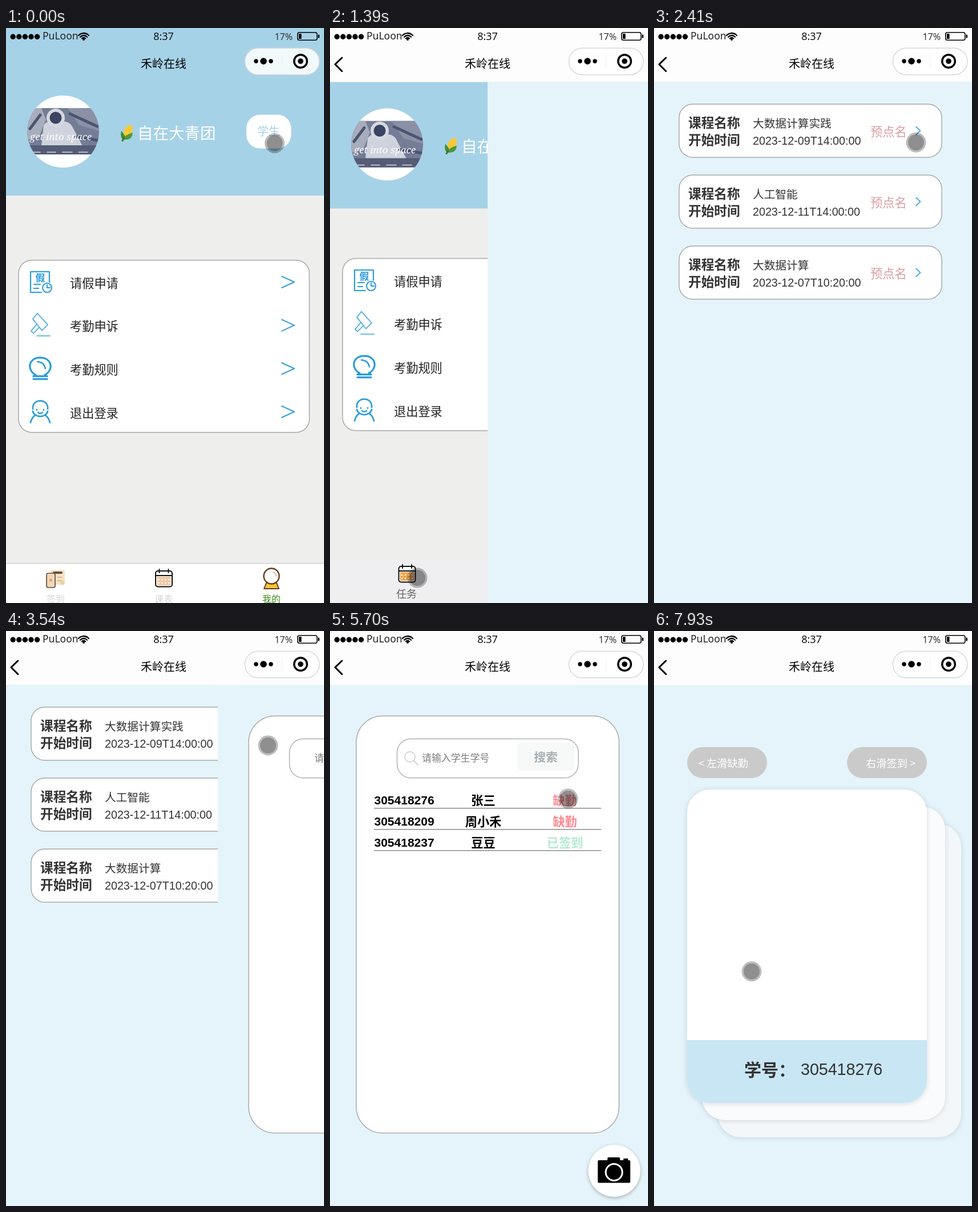
These frames come from a looping animation (557 by 1005 pixels, 8 s). An HTML page with a canvas:

```html
<!DOCTYPE html>
<html lang="zh-CN">
<head>
<meta charset="utf-8">
<style>
html, body { margin: 0; width: 100%; height: 100%; overflow: hidden; background: #fff; }
canvas { display: block; }
</style>
</head>
<body>
<canvas id="stage" width="557" height="1005"></canvas>
<script>
const W = 557, H = 1005, NAV = 94.5, LOOP = 8000, GAP = 8;
const ctx = document.getElementById('stage').getContext('2d');
const HAN = '"Noto Sans CJK SC", "Noto Sans CJK", "Noto Sans", sans-serif';
const ARIAL = '"Liberation Sans", sans-serif';
const UI = '"Noto Sans", sans-serif';
const BLUE = '#2b9cdb', SKY = '#a6d2e7', PALE = '#e5f4fa', EDGE = '#a6aaac';

// Touch moves: start, end, number of steps, destination
const moves = [
  [100, 390, 4, 459, 201], [1030, 1300, 4, 153, 961], [1830, 2410, 7, 459, 200],
  [4480, 4480, 1, 446, 226], [4850, 5050, 3, 414, 305], [5240, 5340, 2, 417, 305],
  [5700, 5700, 1, 417, 293], [6450, 6740, 4, 250, 222], [6830, 7110, 4, 377, 238],
  [7290, 7570, 4, 268, 481], [7750, 7930, 3, 171, 595]
];

// Left edge of each incoming page over time
const slides = {
  list: [[1300, 540], [1390, 276], [1470, 0]],
  search: [[3450, 550], [3540, 371], [3640, 64], [3730, 0]],
  card: [[7190, 64], [7290, 0]]
};

const courses = [
  ['大数据计算实践', '2023-12-09T14:00:00'],
  ['人工智能', '2023-12-11T14:00:00'],
  ['大数据计算', '2023-12-07T10:20:00']
];
const FOUND = '305418276';
const students = [[FOUND, '张三', 0], ['305418209', '周小禾', 0], ['305418237', '豆豆', 1]];

function text(s, x, yc, size, color, { font = HAN, weight = 400, align = 'left' } = {}) {
  ctx.font = `${weight} ${size}px ${font}`;
  ctx.textAlign = align;
  ctx.fillStyle = color;
  ctx.fillText(s, x, yc + size * 0.37);
}

function rect(x, y, w, h, color) {
  ctx.fillStyle = color;
  ctx.fillRect(x, y, w, h);
}

function paint(fill, stroke, width = 1.5) {
  if (fill) { ctx.fillStyle = fill; ctx.fill(); }
  if (stroke) { ctx.strokeStyle = stroke; ctx.lineWidth = width; ctx.stroke(); }
}

function box(x, y, w, h, r, fill, stroke, width) {
  ctx.beginPath();
  ctx.roundRect(x, y, w, h, r);
  paint(fill, stroke, width);
}

function disc(x, y, r, fill, stroke, width) {
  ctx.beginPath();
  ctx.arc(x, y, r, 0, Math.PI * 2);
  paint(fill, stroke, width);
}

function oval(x, y, rx, ry, turn, fill) {
  ctx.beginPath();
  ctx.ellipse(x, y, rx, ry, turn, 0, Math.PI * 2);
  paint(fill);
}

function path(d, stroke, width, fill) {
  const p = new Path2D(d);
  if (fill) { ctx.fillStyle = fill; ctx.fill(p); }
  if (stroke) { ctx.strokeStyle = stroke; ctx.lineWidth = width; ctx.stroke(p); }
}

function at(x, y, draw) {
  ctx.save();
  ctx.translate(x, y);
  draw();
  ctx.restore();
}

function shadowed(color, blur, dy, draw) {
  ctx.save();
  ctx.shadowColor = color;
  ctx.shadowBlur = blur;
  ctx.shadowOffsetY = dy;
  draw();
  ctx.restore();
}

const menu = [
  ['请假申请', () => {
    path('M2 18H-17V-18H16V0', BLUE, 2.2);
    text('假', 0, -7, 17, BLUE, { weight: 700, align: 'center' });
    path('M-11 4H0M-11 11H-3', BLUE, 2.2);
    disc(12, 10, 8, '#fff', BLUE, 2.2);
    path('M12 5V10H17', BLUE, 2);
  }],
  ['考勤申诉', () => {
    path('M-5 -21L13 -1L3 9L-13 -11ZM-6 -2L-16 10L-12 14L-2 4M-6 18.5H17', '#58b2e2', 1.9);
  }],
  ['考勤规则', () => {
    path('M-8 11C-24 3 -21 -19 0 -19C21 -19 24 3 8 11M-8 11L-12 13.5H12L8 11M-12 18.5H12', BLUE, 3.2);
    path('M-5 -12Q7 -11 9 0', BLUE, 2.5);
  }],
  ['退出登录', () => {
    path('M-13 -5C-15 -24 15 -24 13 -5M-13 -1C-10 11 10 11 13 -1', BLUE, 2.7);
    path('M-17 19Q-15 10 -9 6M17 19Q15 10 9 6', BLUE, 2.7);
    path('M-4 1Q0 5 4 1M-6 -4V-3M6 -4V-3', BLUE, 2.4);
  }]
];

function avatar() {
  ctx.save();
  disc(100, 181, 63, '#fff');
  ctx.clip();
  rect(37, 140, 126, 81, '#747c96');
  path('M37 140H62L70 160L58 190L37 196Z', 0, 0, '#a7adbc');
  path('M108 140H163V180L128 170Z', 0, 0, '#8a91a6');
  path('M62 206L66 170Q72 160 92 164Q112 160 118 176L134 206Z', 0, 0, '#cfd3dd');
  disc(87, 157, 16, '#d5d8e0');
  disc(87, 157, 10.5, '#3b4463');
  path('M112 150L160 172M122 190L160 196M42 176L60 152', '#4b5472', 5);
  rect(37, 205, 126, 16, '#555c76');
  text('get into space', 96, 190, 17, '#fff', { font: '"Noto Serif", serif', weight: 'italic 400', align: 'center' });
  path('M46 217H60M72 217H87M99 217H116M127 217H143', '#d5d7df', 1.5);
  ctx.restore();
}

function corn() {
  oval(214, 180, 7, 11, 0.5, '#f8c83c');
  path('M202 180Q199 194 207 195Q213 192 202 180Z', 0, 0, '#3f8f35');
  path('M206 195Q208 186 222 183Q221 197 206 195Z', 0, 0, '#4c9a3b');
  path('M207 192L204 197', '#39742f', 3);
}

function calendar(x, y, dotColor, fill) {
  box(x - 14.5, y - 13, 29, 27.5, 4, '#fff', '#111', 2);
  rect(x - 12, y - 3, 24, 15, fill);
  path(`M${x - 14} ${y - 5}H${x + 14}M${x - 8} ${y - 16}V${y - 10}M${x + 8} ${y - 16}V${y - 10}`, '#111', 2);
  for (let i = 0; i < 8; i++) disc(x - 9 + (i % 4) * 6, y + 2 + (i >> 2) * 6, 1.3, dotColor);
}

function crystalBall(x, y) {
  path(`M${x - 9} ${y + 8}L${x - 13} ${y + 18}H${x + 13}L${x + 9} ${y + 8}Z`, '#6b3d1e', 2, '#f7c534');
  disc(x, y - 4, 13.5, '#fff', '#6b3d1e', 2.4);
  path(`M${x + 3} ${y - 11}Q${x + 8} ${y - 9} ${x + 8} ${y - 4}`, '#c9a98d', 1.5);
}

function studentTabs() {
  rect(0, 935, W, 70, '#fff');
  rect(0, 935, W, 1.5, '#d4d4d4');
  box(78, 947, 25, 26, 3, '#f6e3c5');
  box(82, 950, 17, 4, 2, '#5f5148');
  path('M90 960H98M90 966H97', '#cfae84', 1.6);
  disc(99, 970, 3.5, '#edcda2');
  box(71, 953, 15, 25, 3, '#f2d6b6', '#5f5148', 1.7);
  disc(78.5, 965, 2.5, '#d6a57c');
  calendar(276.5, 962, '#fff', '#f1c9a5');
  crystalBall(465, 962);
  text('签到', 87, 998, 16, '#d6d6d6', { align: 'center' });
  text('课表', 276, 998, 16, '#d6d6d6', { align: 'center' });
  text('我的', 465, 998, 16, '#3a8c1c', { align: 'center' });
}

function teacherTabs() {
  rect(0, 929, W, 76, '#efeef1');
  calendar(135, 954, '#fff', '#f0a650');
  crystalBall(423, 954);
  text('任务', 134, 989, 18, '#666', { align: 'center' });
  text('我的', 423, 989, 18, '#666', { align: 'center' });
}

function profilePage(teacher) {
  const dy = teacher ? -3 : 0;
  rect(0, 0, W, H, '#eeeeed');
  rect(0, 0, W, teacher ? 315.5 : 293, SKY);
  at(0, teacher ? 22.5 : 0, () => {
    avatar();
    corn();
    text('自在大青团', 230, 184, 27.5, '#fff');
    box(421, 151.5, 78.5, 59, 24, '#fff');
    text(teacher ? '老师' : '学生', 460, 181, 20, SKY, { align: 'center' });
  });
  box(22, 405.7 + dy, 509.3, 301, 23, '#fff', '#a9a9a9');
  menu.forEach(([label, icon], i) => {
    const y = 446 + dy + i * 75.6;
    at(60, y - 2, icon);
    text(label, 112, y, 21.2, '#222');
    path(`M483 ${y - 12}L505 ${y - 2}L483 ${y + 8}`, '#3aa0dc', 2.1);
  });
  teacher ? teacherTabs() : studentTabs();
}

function listPage(t) {
  rect(0, 0, W, H, PALE);
  if (t < 1650) return;
  courses.forEach(([name, start], i) => at(0, i * 124, () => {
    box(44, 133, 460, 93, 24, '#fff', EDGE);
    text('课程名称', 60, 166, 22.7, '#333', { weight: 700 });
    text('开始时间', 60, 196, 22.7, '#333', { weight: 700 });
    text(name, 173, 167, 19.7, '#333');
    text(start, 173, 197, 19.7, '#333', { font: ARIAL });
    text('预点名', 379, 181, 21.2, '#d99da1');
    path('M459 172.5L466.5 179.5L459 186.5', '#4dabdf', 1.8);
  }));
}

function cameraButton(loaded) {
  shadowed('rgba(0,0,0,.28)', 6, 2, () => disc(498, 943.5, 45.5, '#fff'));
  if (!loaded) return;
  box(469, 925, 57, 39.5, 2, '#000');
  box(486, 920, 22, 8, 2, '#000');
  rect(514, 922, 8, 4, '#000');
  disc(497.5, 946, 14.5, '#000', '#fff', 3);
}

function searchPage(t) {
  const loaded = t >= 3920, typed = t >= 6830;
  rect(0, 0, W, H, PALE);
  box(46, 148.5, 460.3, 729, 46, '#fff', EDGE);
  box(117.5, 188.5, 317.5, 68.3, 24, '#fff', '#b2b2b2');
  if (loaded) {
    disc(140, 220, 9, null, '#d4d4d4', 1.8);
    path('M146.5 226.5L154 234', '#d4d4d4', 2);
  }
  if (typed) text(FOUND, 161, 224, 17.3, '#333', { font: UI });
  else text('请输入学生学号', 161, 222, 16.9, '#7d7d7d');
  box(328, 195, 100, 49, 6, '#f7f8f8');
  text('搜索', 378, 220, 20.7, '#a9b0b2', { weight: 700, align: 'center' });
  if (t >= 4480) {
    students.forEach(([id, name, present], i) => {
      const y = 296 + i * 37;
      text(id, 77.5, y - 1, 21, '#000', { font: ARIAL, weight: 700 });
      text(name, 268.5, y, 21.2, '#000', { weight: 700, align: 'center' });
      text(present ? '已签到' : '缺勤', 411.5, y, 21.2, present ? '#b3ead3' : '#ff8990', { weight: 700, align: 'center' });
      rect(77, y + 13, 398, 1.5, '#8c8c8c');
    });
    if (t < 4950 || typed) rect(464.5, 287, 4.5, 545, '#b9b9b9');
  }
  cameraButton(loaded);
}

function cardPage() {
  rect(0, 0, W, H, '#e5f3fa');
  box(58, 203, 140, 54, 27, '#cacaca');
  box(338, 203, 140, 54, 27, '#cacaca');
  text('< 左滑缺勤', 78, 231, 18.2, '#fff');
  text('右滑签到 >', 458, 231, 18.2, '#fff', { align: 'right' });
  const sheet = (x, y, w, color) =>
    shadowed('rgba(60,90,110,.2)', 8, 1, () => box(x, y, w, 548, 40, color));
  sheet(112, 337, 426, '#f4f7f9');
  sheet(84, 307, 426, '#fafbfd');
  sheet(58, 277, 420, '#fff');
  box(58, 715, 420, 110, [0, 0, 40, 40], '#c9e6f4');
  text('学号：', 158, 767, 30, '#333', { weight: 700 });
  text(FOUND, 257, 765, 28.6, '#333', { font: ARIAL });
}

function header(white) {
  if (white) {
    rect(0, 0, W, NAV, '#fdfdfd');
    path('M21 52L9 63.5L21 75.5', '#000', 3);
  }
  for (let i = 0; i < 5; i++) disc(12.2 + i * 10.6, 15.3, 4.7, '#000');
  text('PuLoon', 64, 14, 17.5, '#222', { font: UI });
  for (const r of [4, 8, 12]) {
    ctx.beginPath();
    ctx.arc(136, 21, r, -Math.PI * 0.77, -Math.PI * 0.23);
    paint(null, '#000', 2.3);
  }
  disc(136, 20, 2, '#000');
  text('8:37', 276, 14, 18, '#111', { font: UI, align: 'center' });
  text('17%', 502, 15, 16, '#333', { font: UI, align: 'right' });
  box(510.8, 7.8, 34, 13.5, 3, null, '#000', 1.6);
  rect(513, 10, 4.5, 9, '#000');
  box(546.5, 11.5, 2.5, 6, 1, '#000');
  text('禾岭在线', 276, 63, 20, '#000', { align: 'center' });
  box(418.5, 35.2, 130.3, 46.5, 23, white ? '#fff' : 'rgba(255,255,255,.86)', '#d6d8da');
  rect(483, 46, 1, 25, '#f0f0f0');
  disc(438, 58, 3.7, '#000');
  disc(451, 58, 5.8, '#000');
  disc(464, 58, 3.7, '#000');
  disc(516, 58, 11.3, null, '#000', 3.4);
  disc(516, 58, 4.8, '#000');
}

function touch(t) {
  let x = 470.5, y = 201.5;
  for (const [from, to, steps, tx, ty] of moves) {
    if (t < from) break;
    const gap = steps > 1 ? (to - from) / (steps - 1) : 1;
    const k = Math.min(1, (Math.floor((t - from) / gap + 1e-6) + 1) / steps);
    x += (tx - x) * k;
    y += (ty - y) * k;
  }
  disc(x, y, 17.5, 'rgba(0,0,0,.26)');
  disc(x, y, 14, 'rgba(0,0,0,.24)');
}

function edge(steps, t) {
  return steps.reduce((x, [time, left]) => t >= time ? left : x, W);
}

function incoming(steps, t, draw) {
  const left = edge(steps, t);
  if (left >= W) return;
  ctx.save();
  ctx.beginPath();
  ctx.rect(left, NAV, W - left, H - NAV);
  ctx.clip();
  rect(left, NAV, W, H, PALE);
  ctx.translate(left ? left + GAP : 0, 0);
  draw(t);
  ctx.restore();
}

function frame() {
  const t = performance.now() % LOOP;
  ctx.clearRect(0, 0, W, H);
  profilePage(t >= 1030);
  incoming(slides.list, t, listPage);
  incoming(slides.search, t, searchPage);
  incoming(slides.card, t, cardPage);
  header(t >= slides.list[0][0]);
  touch(t);
  requestAnimationFrame(frame);
}

ctx.lineCap = 'round';
ctx.lineJoin = 'round';
frame();
</script>
</body>
</html>
```
